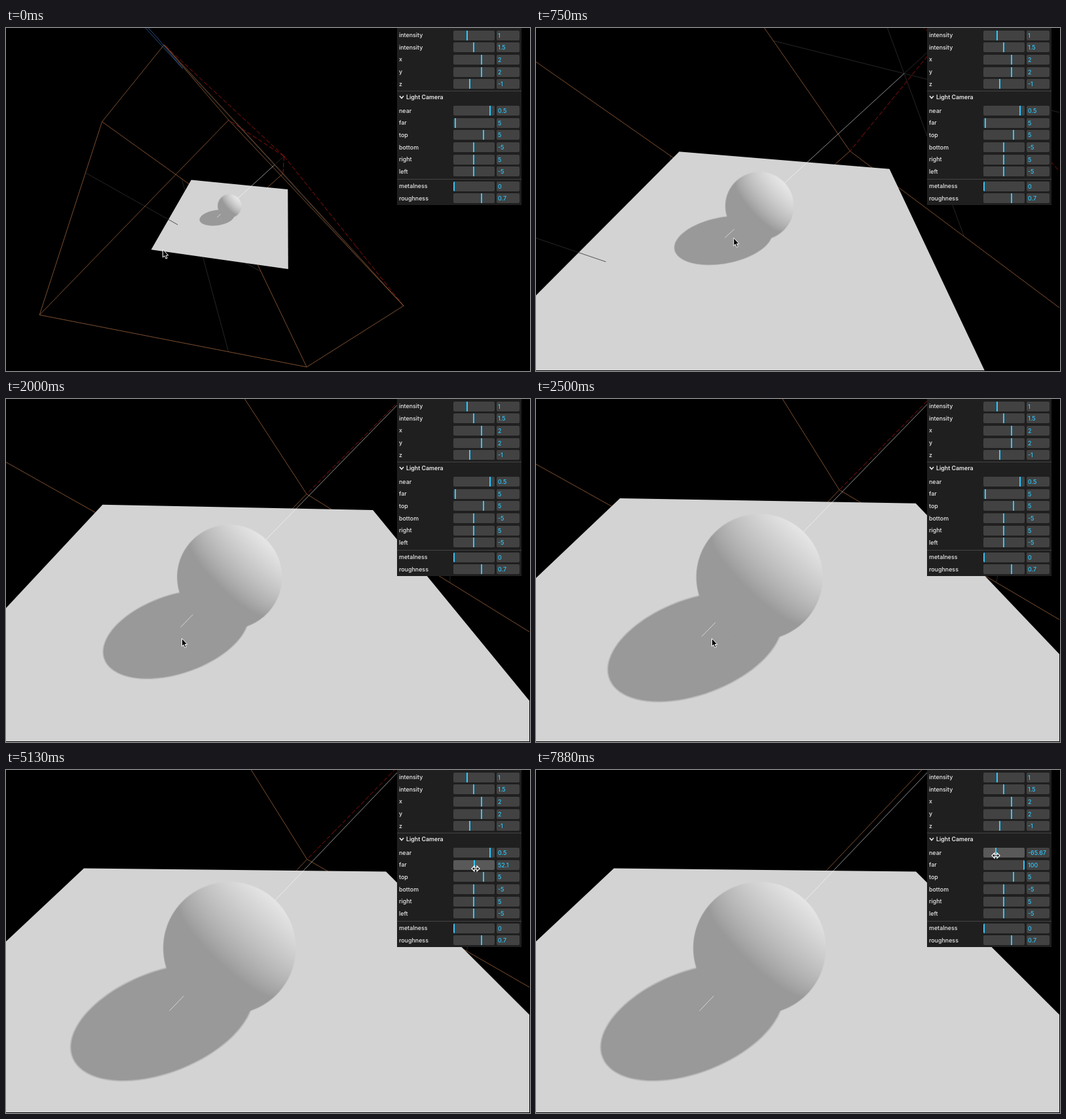
Animation of 800x525 px, one loop 8000 ms. Source, as an HTML page with a canvas:

```html
<!DOCTYPE html>
<html lang="en">
<head>
<meta charset="utf-8">
<title>Light camera</title>
<style>
html, body { margin: 0; width: 100%; height: 100%; overflow: hidden; background: #000; }
#stage { position: relative; width: 800px; height: 525px; overflow: hidden; }
canvas { display: block; }
#panel {
  position: absolute; left: 597px; top: 0; width: 190px; height: 271px;
  background: #1f1f1f; color: #ebebeb; font: 500 8.9px/16px Inter, Roboto, sans-serif;
}
.row { position: absolute; left: 3px; width: 184px; height: 16px; white-space: nowrap; }
.track, .value { position: absolute; top: 0.5px; height: 15px; background: #424242; border-radius: 2px; }
.track { left: 82.5px; width: 63px; overflow: hidden; }
.track.hover { background: #595959; }
.track i { position: absolute; top: 0; width: 2px; height: 15px; background: #2cc9ff; }
.value { left: 149px; width: 35px; text-indent: 2px; line-height: 15.5px; color: #2cc9ff; }
.rule { position: absolute; left: 0; width: 190px; height: 1px; background: #444; }
.title { position: absolute; left: 14px; top: 98px; font-weight: 600; font-size: 8.8px; }
#panel svg { position: absolute; left: 3px; top: 103px; }
.cursor { position: absolute; left: 0; top: 0; overflow: visible; }
</style>
</head>
<body>
<div id="stage">
  <canvas id="view" width="800" height="525"></canvas>
  <div id="panel">
    <div class="rule" style="top:96px"></div>
    <div class="rule" style="top:231px"></div>
    <svg width="8" height="6"><path d="M1 1L4 4.5L7 1" fill="none" stroke="#ebebeb" stroke-width="1.6"/></svg>
    <div class="title">Light Camera</div>
  </div>
  <svg class="cursor" id="arrow" width="10" height="16">
    <path d="M0 0V12L2.6 9.7L4.6 14.2L6.6 13.3L4.7 9H8.3Z" fill="#000" stroke="#fff" stroke-width="1"/>
  </svg>
  <svg class="cursor" id="resize" width="14" height="10">
    <path d="M-6 0L-2 -4V-1.2H2V-4L6 0L2 4V1.2H-2V4Z" fill="#000" stroke="#fff" stroke-width="1.2"/>
  </svg>
</div>
<script>
const LOOP = 8000, STEP = 125;
const FOCAL = 383, CX = 341.2, CY = 272.5, FLOOR = -0.5, RADIUS = 0.5, LINE = 0.8;
const $ = id => document.getElementById(id);
const ctx = $('view').getContext('2d');

// Each key: time, then values; linear in between.
const ORBIT = [ // zoom in halvings, elevation and azimuth in degrees
  [0, 0, 37.6, 10.3], [500, 1.03, 37.5, 10.2], [1000, 2.008, 37.5, 10.2],
  [1125, 2.008, 37.5, 10.2], [1375, 2.116, 37.5, 10.2], [1875, 2.116, 41.8, 2.5],
  [2000, 2.116, 41.8, 2.5], [2625, 2.437, 41.8, 2.2], [2875, 2.437, 41.86, 1.43]
];
const FAR = [[3500, 5], [4375, 28], [5125, 52.1], [6000, 100]];
const NEAR = [[6875, 0.5], [7000, -0.8], [7250, -20], [7500, -44], [7875, -65.67]];
const POINTER = [
  [0, 239.5, 339], [500, 319.5, 299.5], [1000, 284, 343], [1125, 281.5, 346],
  [1375, 256, 359], [1875, 268.5, 366.5], [2625, 268.5, 366.5], [2875, 273, 367],
  [3250, 660, 152], [3375, 692, 143], [3500, 688, 145], [4375, 701, 148],
  [5125, 717, 151], [6000, 747, 148], [6375, 748, 146], [6750, 740, 129],
  [6875, 740, 128], [7000, 739, 128], [7250, 728, 129], [7500, 714, 130], [7875, 702, 131]
];

function sample(keys, t) {
  const i = keys.findIndex(k => k[0] > t);
  if (i < 0) return keys[keys.length - 1].slice(1);
  if (!i) return keys[0].slice(1);
  const a = keys[i - 1], b = keys[i], f = (t - a[0]) / (b[0] - a[0]);
  return a.slice(1).map((v, j) => v + (b[j + 1] - v) * f);
}

// Panel rows: label, centre y, handle x, value
const rows = {};
[['intensity', 11, 704, 1], ['intensity', 29.5, 714, 1.5], ['x', 48, 726, 2], ['y', 67, 726, 2],
 ['z', 85.5, 708, -1], ['near', 126.5, 740, 0.5], ['far', 145, 686, 5], ['top', 163.5, 729.5, 5],
 ['bottom', 182.5, 714, -5], ['right', 201, 714, 5], ['left', 219.5, 714, -5],
 ['metalness', 242, 684, 0], ['roughness', 260.5, 726, 0.7]
].forEach(([label, y, x, value]) => {
  const row = document.createElement('div');
  row.className = 'row';
  row.style.top = y - 8 + 'px';
  row.innerHTML = `${label}<div class="track"><i style="left:${x - 684}px"></i></div><div class="value">${value}</div>`;
  $('panel').append(row);
  rows[label] = {
    track: row.querySelector('.track'),
    handle: row.querySelector('i'),
    value: row.querySelector('.value')
  };
});

function setRow(row, value, min, max, digits, hover) {
  row.handle.style.left = Math.min(61, (value - min) / (max - min) * 62 - 0.7) + 'px';
  row.value.textContent = +value.toFixed(digits);
  row.track.classList.toggle('hover', hover);
}

// Light at (2, 2, -1) looking at the origin, with its axes
const LIGHT = [2, 2, -1], LZ = LIGHT.map(v => v / 3);
const LX = [-1, 0, -2].map(v => v / Math.sqrt(5));
const LY = [LZ[1] * LX[2], LZ[2] * LX[0] - LZ[0] * LX[2], -LZ[1] * LX[0]];
const lightPoint = (x, y, depth) => LIGHT.map((v, i) => v + LX[i] * x + LY[i] * y - LZ[i] * depth);
const along = k => LZ.map(v => v * k);

let cam;
function setCamera(zoom, elevation, azimuth) {
  const e = elevation * Math.PI / 180, a = azimuth * Math.PI / 180;
  cam = { d: 10.6 * 0.5 ** zoom, se: Math.sin(e), ce: Math.cos(e), sa: Math.sin(a), ca: Math.cos(a) };
}
// Rotate into right, up, toward
function turn([x, y, z]) {
  const near = x * cam.sa + z * cam.ca;
  return [x * cam.ca - z * cam.sa, y * cam.ce - near * cam.se, y * cam.se + near * cam.ce];
}
function project(p) {
  const [x, y, near] = turn(p), k = FOCAL / (cam.d - near);
  return [CX + x * k, CY - y * k];
}

// Part of a segment where the linear function f is positive
function clip(seg, f) {
  if (!seg) return null;
  const [a, b] = seg, fa = f(a), fb = f(b);
  if (fa < 0 && fb < 0) return null;
  if (fa >= 0 && fb >= 0) return seg;
  const m = a.map((v, i) => v + (b[i] - v) * fa / (fa - fb));
  return fa >= 0 ? [a, m] : [m, b];
}
const ORANGE = '#9c633c', RED = '#b01814', BLUE = '#35609f', GRAY = '#303030';
const WHITE = 'rgba(255,255,255,.7)';

function line(color, a, b, side = 0) {
  let seg = [a, b];
  if (side) seg = clip(seg, p => side * (p[1] - FLOOR));
  seg = clip(seg, p => cam.d - turn(p)[2] - 0.1);
  if (!seg) return;
  ctx.strokeStyle = color;
  ctx.setLineDash(color === RED ? [7, 3] : []);
  ctx.beginPath();
  ctx.moveTo(...project(seg[0]));
  ctx.lineTo(...project(seg[1]));
  ctx.stroke();
}
function polygon(points) {
  ctx.beginPath();
  points.forEach(p => ctx.lineTo(...project(p)));
  ctx.closePath();
}

function helperLines(near, far) {
  const corners = [[-5, -5], [5, -5], [5, 5], [-5, 5]];
  const out = [], add = (color, a, b) => out.push([color, a, b]);
  for (const depth of [near, far]) {
    add(GRAY, lightPoint(-5, 0, depth), lightPoint(5, 0, depth));
    add(GRAY, lightPoint(0, -5, depth), lightPoint(0, 5, depth));
  }
  add(GRAY, LIGHT, lightPoint(0, 0, near));
  corners.forEach((c, i) => {
    const next = corners[(i + 1) % 4];
    add(RED, LIGHT, lightPoint(...c, near));
    add(ORANGE, lightPoint(...c, near), lightPoint(...next, near));
    add(ORANGE, lightPoint(...c, far), lightPoint(...next, far));
    add(ORANGE, lightPoint(...c, near), lightPoint(...c, far));
  });
  const up = [[3.5, 5.5], [-3.5, 5.5], [0, 10]].map(p => lightPoint(...p, near));
  up.forEach((p, i) => add(BLUE, p, up[(i + 1) % 3]));
  return out;
}

function drawShadow() {
  const points = [];
  for (let i = 0; i < 96; i++) {
    const a = i / 48 * Math.PI, c = RADIUS * Math.cos(a), s = RADIUS * Math.sin(a);
    const p = LX.map((v, j) => v * c + LY[j] * s);
    const k = (p[1] - FLOOR) / LZ[1];
    points.push(p.map((v, j) => v - LZ[j] * k));
  }
  polygon(points);
  ctx.fillStyle = '#999';
  ctx.fill();
  ctx.setLineDash([]);
  ctx.strokeStyle = 'rgba(153,153,153,.45)';
  ctx.lineWidth = 0.018 * FOCAL / cam.d;
  ctx.stroke();
  ctx.lineWidth = LINE;
}

const ball = document.createElement('canvas'), ballCtx = ball.getContext('2d');
const toSrgb = v => 255 * (1.055 * v ** (1 / 2.4) - 0.055);

// Ray-traced diffuse shading with ambient light 1 and directional light 1.5
function drawSphere() {
  const d = cam.d, r = FOCAL * RADIUS / Math.sqrt(d * d - RADIUS * RADIUS);
  const half = Math.ceil(r) + 1, size = half * 2;
  const [lx, ly, lz] = turn(LZ);
  ball.width = ball.height = size;
  const img = ballCtx.createImageData(size, size);
  for (let j = 0, o = 0; j < size; j++) {
    for (let i = 0; i < size; i++, o += 4) {
      const x = i + 0.5 - half, y = half - j - 0.5;
      const alpha = Math.min(1, r - Math.hypot(x, y) + 0.5);
      if (alpha <= 0) continue;
      const len = Math.hypot(x, y, FOCAL), b = d * FOCAL / len;
      const t = (b - Math.sqrt(Math.max(0, b * b - d * d + RADIUS * RADIUS))) / len;
      const lit = Math.max(0, (t * x * lx + t * y * ly + (d - t * FOCAL) * lz) / RADIUS);
      const v = toSrgb((1 + 1.5 * lit) / Math.PI);
      img.data[o] = img.data[o + 1] = img.data[o + 2] = v;
      img.data[o + 3] = alpha * 255;
    }
  }
  ballCtx.putImageData(img, 0, 0);
  ctx.drawImage(ball, CX - half, CY - half);
}

function drawScene(near, far) {
  const lines = helperLines(near, far);
  ctx.fillStyle = '#000';
  ctx.fillRect(0, 0, 800, 525);
  ctx.lineWidth = LINE;
  lines.forEach(l => line(...l, -1));
  polygon([[-2.5, FLOOR, -2.5], [2.5, FLOOR, -2.5], [2.5, FLOOR, 2.5], [-2.5, FLOOR, 2.5]]);
  ctx.fillStyle = '#d3d3d3';
  ctx.fill();
  drawShadow();
  lines.forEach(l => line(...l, 1));
  line(WHITE, along(-RADIUS), along(-0.75));
  drawSphere();
  line(WHITE, lightPoint(0, 0, near), along(RADIUS));
  ctx.fillStyle = '#000';
  ctx.fillRect(799, 0, 1, 525);
  ctx.fillRect(0, 524, 800, 1);
}

function render(t) {
  const [near] = sample(NEAR, t), [far] = sample(FAR, t), [x, y] = sample(POINTER, t);
  setCamera(...sample(ORBIT, t));
  drawScene(near, far);
  const sliding = t >= 3375;
  setRow(rows.near, near, -100, 10, 2, t >= 6750);
  setRow(rows.far, far, 0, 100, 1, sliding && t < 6750);
  $('arrow').style.display = sliding ? 'none' : '';
  $('resize').style.display = sliding ? '' : 'none';
  $(sliding ? 'resize' : 'arrow').style.transform = `translate(${x}px,${y}px)`;
}

let shown = -1;
function tick() {
  const step = Math.floor(performance.now() % LOOP / STEP);
  if (step !== shown) render((shown = step) * STEP);
  requestAnimationFrame(tick);
}
tick();
</script>
</body>
</html>
```
